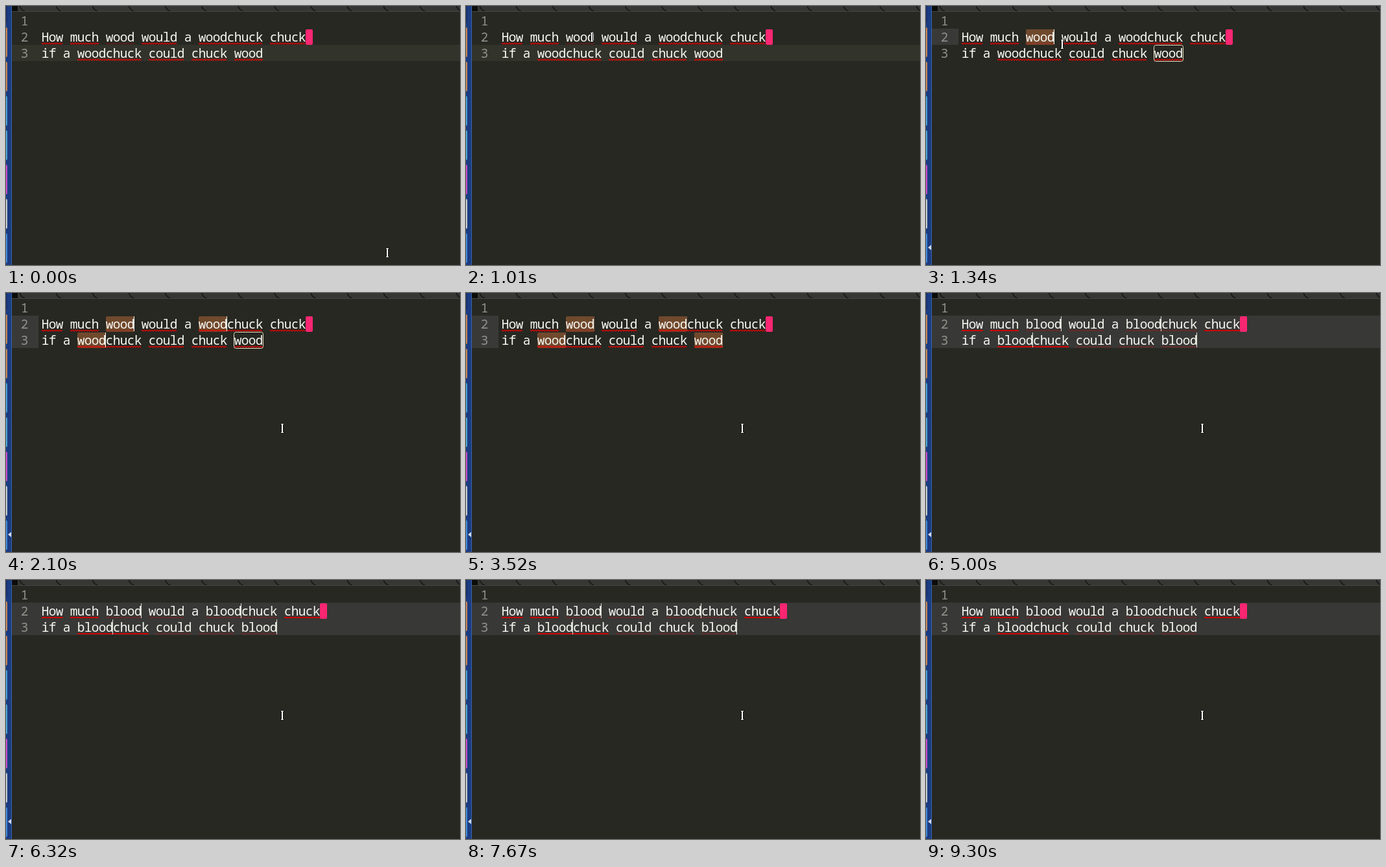
An HTML page with a canvas that plays this animation: 700x400 px, repeating every 9590 ms.

```html
<!DOCTYPE html>
<html lang="en">
<head>
<meta charset="utf-8">
<title>Multiple selection</title>
<style>
html, body { margin: 0; width: 100%; height: 100%; overflow: hidden; background: #272822; }
canvas { display: block; }
</style>
</head>
<body>
<canvas id="stage" width="700" height="400"></canvas>
<script>
const ctx = document.getElementById('stage').getContext('2d');
const LOOP = 9590, CELL = 11, LEFT = 55, LINE = 25;
const CLICK = 1160, TYPE = 4000;
const picks = [1230, 1810, 2100, 2340];
const strokes = [4000, 4150, 4340, 4490, 4600];
const lines = ['How much @ would a @chuck chuck', 'if a @chuck could chuck @'];
const slots = [2, 5];
// words with a bright underline, per line
const misspelt = {
  before: [[0, 1, 3, 5, 6], [2, 3, 4, 5]],
  after: [[0, 1, 6], [2]]
};
// caret opacity: time, value
const blink = [
  [40, 0], [340, 1], [640, 1], [950, 0], [1159, 0], [1160, 1],
  [2680, 1], [3000, 0], [3480, 0], [3780, 1],
  [4960, 1], [5290, 0], [5720, 0], [6000, 1],
  [6280, 1], [6600, 0], [7060, 0], [7340, 1],
  [7630, 1], [7950, 0], [8430, 0], [8830, 1],
  [8980, 1], [9300, 0]
];
const tiles = ['#c5875a', '#c5875a', '#459fd2', '#4aa6cf', '#c44cc8', '#c3c9d0', '#3f88d8'];

const clamp = v => Math.max(0, Math.min(1, v));
const ease = v => v * v * (3 - 2 * v);
const rowY = row => 35 + row * LINE;
const colX = col => LEFT + col * CELL;

function rect(x, y, w, h, color) {
  ctx.fillStyle = color;
  ctx.fillRect(x, y, w, h);
}

function roundBox(x, y, w, h, r, color) {
  ctx.beginPath();
  ctx.roundRect(x, y, w, h, r);
  ctx.fillStyle = color;
  ctx.fill();
}

function text(str, x, y, color) {
  ctx.fillStyle = color;
  [...str].forEach((c, i) => ctx.fillText(c, x + (i + 0.5) * CELL, y));
}

function caretAlpha(t) {
  const i = blink.findIndex(k => k[0] > t);
  if (i < 1) return 0;
  const [t0, a] = blink[i - 1], [t1, b] = blink[i];
  return a + (b - a) * (t - t0) / (t1 - t0);
}

function drawFrame(focused) {
  rect(0, 0, 9, 400, '#1b3c82');
  rect(0, 0, 2, 26, '#17306a');
  tiles.forEach((color, i) => roundBox(-4, 33 + i * 53, 6, 46, 2, color));
  rect(8, 0, 1, 400, '#3d65ac');
  if (focused) {
    ctx.fillStyle = '#d5dbe6';
    ctx.beginPath();
    ctx.moveTo(3, 373);
    ctx.lineTo(8, 369);
    ctx.lineTo(8, 377);
    ctx.fill();
  }
  rect(9, 0, 691, 9, '#363734');
  rect(9, 0, 9, 8, '#0c0d0b');
  ctx.strokeStyle = '#151613';
  ctx.lineWidth = 1.5;
  for (let x = 21; x < 700; x += 56.1) {
    ctx.beginPath();
    ctx.moveTo(x, 0);
    ctx.quadraticCurveTo(x + 3, 7, x + 8, 8);
    ctx.stroke();
  }
  rect(9, 8, 691, 1, '#454641');
}

function underline(x, width, row, wavy, opacity) {
  const y = rowY(row) + 22;
  ctx.globalAlpha = opacity;
  if (wavy) {
    ctx.beginPath();
    for (let d = 0; d <= width; d += 2) ctx.lineTo(x + d, y + (d % 4 ? 2 : 0));
    ctx.strokeStyle = '#e60000';
    ctx.lineWidth = 1.2;
    ctx.stroke();
  } else rect(x, y, width, 2, '#d00000');
  ctx.globalAlpha = 1;
}

function pointer(t) {
  const a = ease(clamp((t - 50) / 960)), b = ease(clamp((t - 1260) / 500));
  const x = Math.round(588 - 394 * a + 232 * b);
  const y = Math.round(381 - 333 * a + 161 * b);
  for (const [color, grow] of [['#111', 1], ['#fff', 0]]) {
    rect(x - 1 - grow, y - 6 - grow, 2 + 2 * grow, 12 + 2 * grow, color);
    for (const edge of [-7, 6])
      rect(x - 2 - grow, y + edge - grow / 2, 4 + 2 * grow, 1 + grow, color);
  }
}

function draw(t) {
  const typed = t >= TYPE, clicked = t >= CLICK;
  const word = typed ? 'blood'.slice(0, strokes.filter(k => t >= k).length) : 'wood';
  const selected = picks.filter(p => t >= p).length;
  const carets = [];

  rect(0, 0, 700, 400, '#272822');
  if (typed) rect(9, 35, 691, 50, '#383836');
  else if (selected) rect(9, 35, 41, selected > 2 ? 50 : 25, '#393a38');
  else rect(9, rowY(clicked ? 0 : 1), 691, LINE, '#32332b');
  drawFrame(t >= 1200);

  for (const n of [1, 2, 3]) text(String(n), 23, 5 + n * LINE, '#90918b');

  lines.forEach((template, row) => {
    const str = template.replaceAll('@', word), y = rowY(row);
    const bright = misspelt[typed ? 'after' : 'before'][row];
    let col = 0;
    str.split(' ').forEach((part, i) => {
      const x = colX(col), slot = slots.indexOf(i);
      if (slot >= 0) {
        const end = colX(col + word.length), order = row * 2 + slot;
        if (order < selected) carets.push([end - 1, y + 1]);
        if (!typed && order < selected) {
          roundBox(x, y + 1, end - x, 24, 2, '#70492d');
        } else if (!typed && selected && order === 3) {
          ctx.beginPath();
          ctx.roundRect(x - 0.5, y + 0.5, end - x + 1, 25, 3);
          ctx.strokeStyle = '#e4dfc0';
          ctx.lineWidth = 1;
          ctx.stroke();
        }
      }
      const width = part.length * CELL;
      if (bright.includes(i)) underline(x, width, row, !typed, 1);
      else if (part.length > 2) underline(x, width, row, true, 0.3);
      col += part.length + 1;
    });
    text(str, LEFT, y + 20, '#f8f8f2');
    if (row === 0) roundBox(colX(str.length), y + 1, CELL, 24, 2, '#f92672');
  });

  if (!selected) carets.push(clicked ? [197, 36] : [54, 61]);
  ctx.globalAlpha = caretAlpha(t);
  for (const [x, y] of carets) rect(x, y, 1, 23, '#f8f8f0');
  ctx.globalAlpha = 1;
  pointer(t);
}

ctx.font = '19.5px "Noto Sans Mono", "DejaVu Sans Mono", monospace';
ctx.textAlign = 'center';
const start = performance.now();
function tick() {
  draw((performance.now() - start) % LOOP);
  requestAnimationFrame(tick);
}
tick();
</script>
</body>
</html>
```
